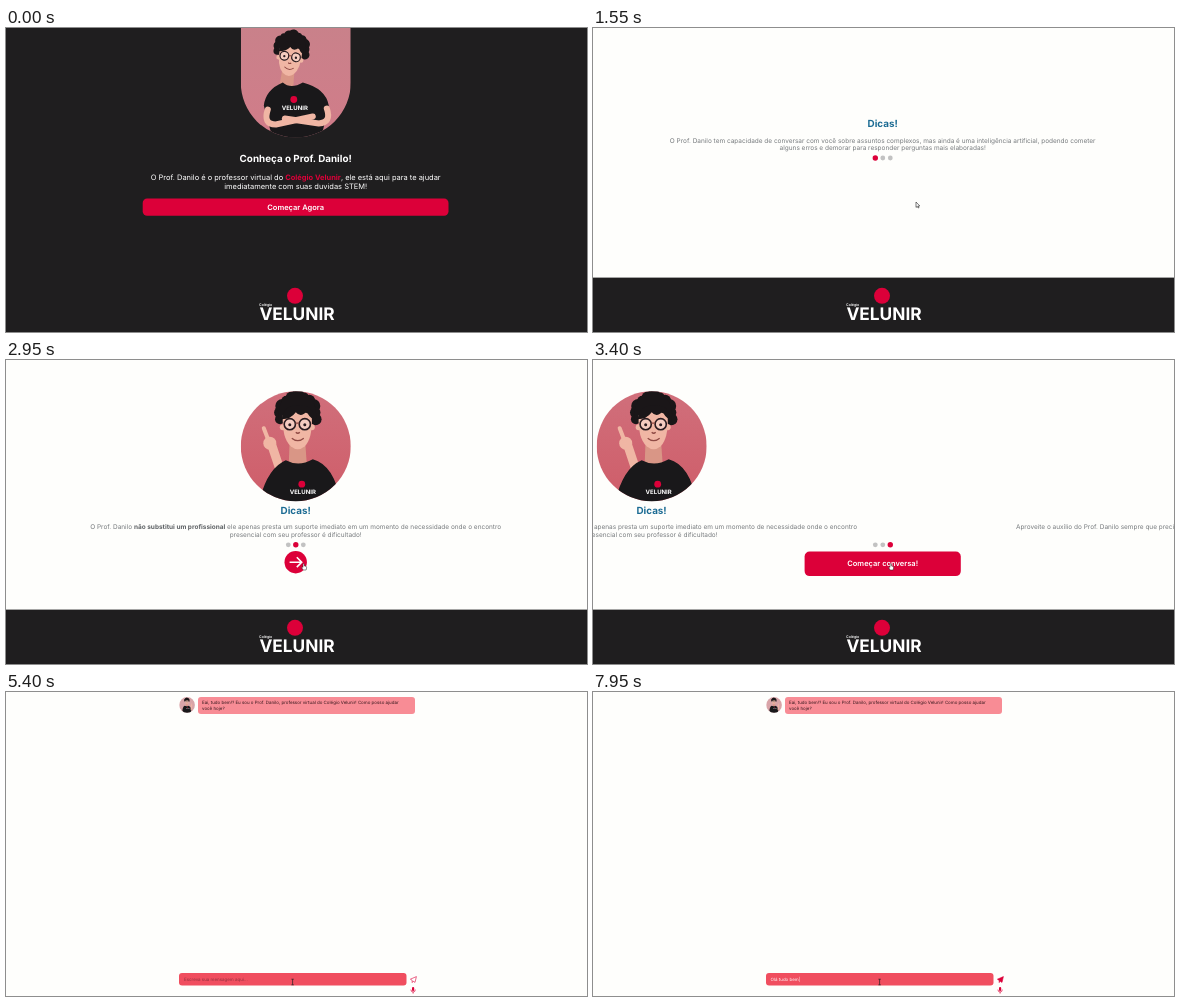
These frames come from a looping animation (581x304 px, 8 s). An HTML page:

```html
<!DOCTYPE html>
<html lang="pt-BR">
<head>
<meta charset="utf-8">
<title>Prof. Danilo</title>
<style>
html, body { margin: 0; width: 100%; height: 100%; overflow: hidden; background: #fefefc; }
svg { display: block; width: 100vw; height: 100vh; }
text { font-family: Inter, sans-serif; text-rendering: geometricPrecision; white-space: pre; }
.mid { text-anchor: middle; }
.title { font-size: 9.85px; font-weight: 700; }
.lead { font-size: 7.47px; fill: #fff; }
.btn { font-size: 7.5px; font-weight: 600; fill: #fff; }
.tip { font-size: 6.48px; fill: #777b7e; }
.tip .b { font-weight: 700; fill: #5d6164; }
.red { font-weight: 700; fill: #dc0039 !important; }
.chat { font-size: 4.45px; }
</style>
</head>
<body>
<svg id="stage" viewBox="0 0 581 304" xmlns="http://www.w3.org/2000/svg"></svg>
<script>
const LOOP = 8000, MID = 289.7;
const RED = '#dc0039', DARK = '#1f1e1f', SKIN = '#f0b6a4', HAIR = '#1a1618', SHIRT = '#19181a';
const SCHOOL = '<tspan class="red">Colégio Velunir</tspan>';
const stage = document.getElementById('stage');

const label = (cls, x, y, str, more = '') => `<text class="${cls}" x="${x}" y="${y}" ${more}>${str}</text>`;
const dot = (x, y, r, fill) => `<circle cx="${x}" cy="${y}" r="${r}" fill="${fill}"/>`;
const box = (x, y, w, h, r, fill) => `<rect x="${x}" y="${y}" width="${w}" height="${h}" rx="${r}" fill="${fill}"/>`;
const fill = (d, c) => `<path d="${d}" fill="${c}"/>`;
const limb = (d, w) => `<path d="${d}" fill="none" stroke="${SKIN}" stroke-width="${w}" stroke-linecap="round" stroke-linejoin="round"/>`;

// Head drawn around the bridge of the glasses
function head(x, y, s, tilt = 0) {
  let curls = '';
  for (let i = 0; i < 11; i++) {
    const a = Math.PI * (0.95 + i * 0.11);
    curls += dot(Math.cos(a) * 18 + 1, Math.sin(a) * 20 - 8, 5 + (i * 7 % 3), HAIR);
  }
  const lens = cx => `<circle cx="${cx}" cy="0" r="5.6" fill="#fff" fill-opacity=".3" stroke="#2a1c20" stroke-width="1.6"/>${dot(cx, 0.5, 1.5, '#2a1c20')}`;
  return `<g transform="translate(${x} ${y}) rotate(${tilt}) scale(${s})">
    ${fill('M-7 12H8L10 40H-8Z', '#d99686')}
    ${curls}${fill('M-18 -4Q-20 -30 0 -31Q22 -30 19 -3Z', HAIR)}
    ${dot(-14, 3, 3, SKIN)}${dot(15, 3, 3, SKIN)}
    ${fill('M-14 -9Q0 -17 15 -9Q16 14 8 22Q1 28 -6 22Q-15 14 -14 -9Z', SKIN)}
    ${fill('M-15 -5Q-13 -20 2 -19Q17 -20 17 -5Q12 -7 10 -13Q4 -6 -1 -12Q-6 -5 -15 -5Z', HAIR)}
    ${lens(-7)}${lens(8)}
    <path d="M-1.4 -1H2.4M-1 8Q1 10 3 8M-5 14Q1 19 7 14" fill="none" stroke="#8f4a44" stroke-width="1.3"/>
  </g>`;
}
const badge = (x, y) => dot(x, y, 3.4, RED) + label('mid', x + 1, y + 10, 'VELUNIR', 'font-size="6" font-weight="700" fill="#fff"');
const picture = (x, y, s, clip, bg, body) =>
  `<g transform="translate(${x} ${y}) scale(${s})"><g clip-path="url(#${clip})">${box(0, 0, 110, 110, 0, bg)}${body}</g></g>`;

const crossed = head(49, 29, 0.78, 8)
  + fill('M23 78Q25 62 42 55Q50 62 62 55Q85 61 88 78L80 112H32Z', SHIRT) + badge(53, 72)
  + limb('M27 82Q22 97 35 97L72 89', 6) + limb('M86 81Q91 95 78 96L44 91', 6);
const pointing = head(53, 31, 0.8)
  + fill('M22 112Q21 68 38 61Q52 68 66 60Q80 64 84 88Q85 100 79 112Z', SHIRT) + badge(59, 75)
  + limb('M83 88L87 62', 7) + dot(86, 57, 5.5, SKIN) + limb('M86 55L87 46', 3);
const warning = head(56, 33, 1) + limb('M31 54L41 84', 9) + dot(29, 52, 6.5, SKIN) + limb('M28 50L23 37', 4)
  + fill('M18 112Q26 77 45 69Q58 76 72 68Q94 74 100 112Z', SHIRT) + badge(61, 93);
const campus = fill('M0 84H110V110H0Z', '#e9b9b8') + fill('M0 64L14 54L28 62H52V88H0Z', '#e2aaa8')
  + fill('M10 56V40L14 30L18 40V56Z', '#cf8084') + fill('M0 62L14 51L22 56H46V63H28L14 56L0 66Z', '#c4565f')
  + [4, 12, 20, 32, 40].map(x => box(x, 68, 4, 9, 1, '#fae6e4')).join('')
  + head(50, 40, 1.05, 11)
  + fill('M38 112Q42 78 52 70Q60 76 72 65Q98 74 104 112Z', SHIRT) + badge(64, 93);

const logo = dot(289, 267.8, 8, RED) + label('', 253, 278.2, 'Colégio', 'font-size="3.6" font-weight="600" fill="#fff"')
  + label('mid', 291, 292.2, 'VELUNIR', 'font-size="17.3" font-weight="700" fill="#fff"');
const footer = box(0, 249.6, 581, 55, 0, DARK) + logo;

const intro = box(0, 0, 581, 304, 0, DARK)
  + picture(234.8, -0.5, 1, 'arch', 'url(#blush)', crossed)
  + label('title mid', MID, 134, 'Conheça o Prof. Danilo!', 'fill="#fff"')
  + label('lead mid', MID, 151.5, `O Prof. Danilo é o professor virtual do ${SCHOOL}, ele está aqui para te ajudar`)
  + label('lead mid', MID, 160.5, 'imediatamente com suas duvidas STEM!')
  + box(136.7, 170.5, 305.8, 17.2, 4.5, RED) + label('btn mid', MID, 181.8, 'Começar Agora') + logo;

function slide(i, art, bg, first, second) {
  return `<g transform="translate(${i * 581} 0)"><g class="art">${picture(234.8, 31.2, 1, 'disc', bg, art)}</g>`
    + label('title mid', MID, 154.2, 'Dicas!', 'fill="#1b6b93"')
    + label('tip mid', MID, 169.4, first) + label('tip mid', MID, 177.1, second) + '</g>';
}
const tips = `<g id="deck"><g id="track">`
  + slide(0, pointing, '#f7b1b0', 'O Prof. Danilo tem capacidade de conversar com você sobre assuntos complexos, mas ainda é uma inteligência artificial, podendo cometer',
    'alguns erros e demorar para responder perguntas mais elaboradas!')
  + slide(1, warning, 'url(#rose)', 'O Prof. Danilo <tspan class="b">não substitui um profissional</tspan> ele apenas presta um suporte imediato em um momento de necessidade onde o encontro',
    'presencial com seu professor é dificultado!')
  + slide(2, campus, 'url(#sky)', `Aproveite o auxílio do Prof. Danilo sempre que precisar, porém, recomendamos sempre os professores <tspan class="b">STEM</tspan> do ${SCHOOL}. Uma escola`,
    'preparada para você e para o futuro!')
  + `</g>${[282.3, 289.8, 297.3].map(x => `<circle class="dot" cx="${x}" cy="184.8"/>`).join('')}
  <g id="next">${dot(MID, 202.2, 11.2, RED)}<path d="M283.6 202.2H295.4M290.8 197.3L295.7 202.2L290.8 207.1" fill="none" stroke="#fff" stroke-width="1.6"/></g>
  <g id="start">${box(211.6, 191.5, 156.2, 24.6, 5, RED)}${label('btn mid', MID, 206.3, 'Começar conversa!')}</g></g>` + footer;

const chat = picture(173.2, 5.1, 0.143, 'disc', '#d9a4a8', pointing)
  + box(192, 5, 217, 17, 3, '#f88c95')
  + label('chat', 196, 12.2, 'Eai, tudo bem!? Eu sou o Prof. Danilo, professor virtual do Colégio Velunir! Como posso ajudar', 'fill="#33161b"')
  + label('chat', 196, 17.8, 'você hoje?', 'fill="#33161b"')
  + box(173, 281, 227.5, 12.5, 3, '#f04e5f')
  + label('chat', 178, 289.2, 'Escreva sua mensagem aqui...', 'id="hint" fill="#93303f"')
  + label('chat', 177.6, 289.2, '', 'id="typed" fill="#fff"')
  + `<path id="send" d="M404.4 287.2L410.4 284.6L409 290.4L407.2 289.2L406.2 290.6V288.4Z" stroke="${RED}" stroke-width=".6" stroke-linejoin="round"/>`
  + box(406, 295, 2.2, 4, 1.1, RED)
  + `<path d="M404.9 297.6Q405 300 407.1 300T409.3 297.6M407.1 300V301.6" fill="none" stroke="${RED}" stroke-width=".7"/>`;

const pointer = `<g id="pointer">
  <path id="arrow" d="M0 0V5.4L1.3 4.3L2.1 6L3 5.6L2.2 4H3.8Z" fill="#fff" stroke="#222" stroke-width=".6"/>
  <path id="hand" d="M-.6 3.4V.6Q0 -.4 .6 .6V2.4L2.6 3Q3.2 3.4 3 4.6L2.5 6.6H-.4L-2 4.2Q-1.6 3.3 -.6 4Z" fill="#fff" stroke="#222" stroke-width=".5"/>
  <path id="beam" d="M-1.2 -2.8H1.2M0 -2.8V2.8M-1.2 2.8H1.2" fill="none" stroke="#222" stroke-width=".7"/></g>`;

const fade = (id, from, to) =>
  `<linearGradient id="${id}" x2="0" y2="1"><stop stop-color="${from}"/><stop offset="1" stop-color="${to}"/></linearGradient>`;

stage.innerHTML = `<defs>
  <clipPath id="disc"><circle cx="55" cy="55" r="55"/></clipPath>
  <clipPath id="arch"><path d="M0 0H110V55A55 55 0 0 1 0 55Z"/></clipPath>
  ${fade('rose', '#d06f7b', '#cf5d69')}${fade('blush', '#c9818a', '#d17c89')}${fade('sky', '#f3cfcf', '#f8e0df')}
  </defs>${box(0, 0, 581, 304, 0, '#fefefc')}
  <g id="intro">${intro}</g><g id="tips">${tips}</g><g id="chat">${chat}</g>${pointer}`;

const el = id => document.getElementById(id);
const show = (node, on) => node.setAttribute('display', on ? 'inline' : 'none');
const move = (id, x, y) => el(id).setAttribute('transform', `translate(${x} ${y})`);
const clamp = v => Math.max(0, Math.min(1, v));
const ease = (t, from, to) => {
  const p = clamp((t - from) / (to - from));
  return p * p * (3 - 2 * p);
};

const moves = [[50, 850, 323, 174], [1600, 2350, 297.6, 203.4], [4000, 5150, 286.6, 290]];
function pointerAt(t) {
  let x = 441, y = 284;
  for (const [from, to, tx, ty] of moves) {
    const k = ease(t, from, to);
    x += (tx - x) * k;
    y += (ty - y) * k;
  }
  return [x, y];
}

const message = 'Olá tudo bem';
const keys = [5900, 6400, 6550, 6700, 6850, 7000, 7150, 7200, 7400, 7550, 7700, 7850];

function draw(t) {
  const page = t < 1550 ? 'intro' : t < 4000 ? 'tips' : 'chat';
  ['intro', 'tips', 'chat'].forEach(id => show(el(id), id === page));

  const loaded = t >= 1700;
  const index = t < 2550 ? 0 : t < 3250 ? 1 : 2;
  move('deck', 0, loaded ? 0 : -54.8);
  move('track', -581 * (ease(t, 2550, 2910) + ease(t, 3250, 3600)), 0);
  document.querySelectorAll('.art').forEach(n => show(n, loaded));
  document.querySelectorAll('.dot').forEach((n, i) => {
    n.setAttribute('r', i === index ? 2.7 : 2.4);
    n.setAttribute('fill', i === index ? RED : '#c2c2c2');
  });
  show(el('next'), loaded && index < 2);
  show(el('start'), index === 2);

  const count = keys.filter(k => t >= k).length;
  el('typed').textContent = t >= 5700 ? message.slice(0, count) + '|' : '';
  show(el('hint'), !count);
  el('send').setAttribute('fill', count ? RED : '#fff');

  const [x, y] = pointerAt(t);
  const hot = page === 'intro' ? y > 171 && y < 188 && x < 443
    : page === 'tips' && loaded && Math.hypot(x - MID, y - 202.2) < 11.2;
  const beam = page === 'chat' && y > 281;
  show(el('pointer'), t >= 50);
  move('pointer', x, y);
  show(el('hand'), hot);
  show(el('beam'), beam);
  show(el('arrow'), !hot && !beam);
}

const begin = performance.now();
function tick(now) {
  draw(Math.max(0, now - begin) % LOOP);
  requestAnimationFrame(tick);
}
draw(0);
requestAnimationFrame(tick);
</script>
</body>
</html>
```
